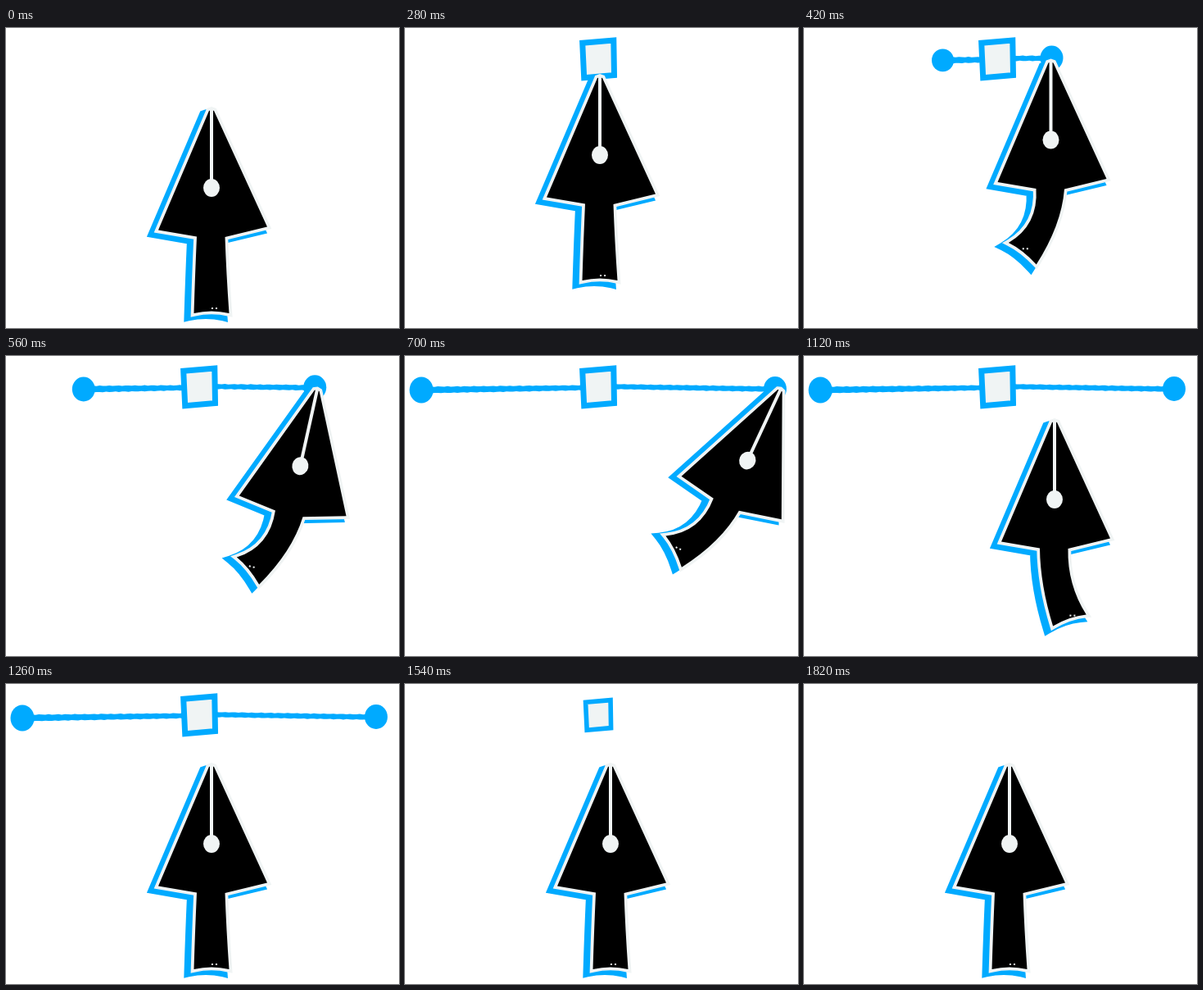
Write an HTML page with a canvas that moves like this. It is 480 by 366 pixels and loops after 1.96 s.

```html
<!DOCTYPE html>
<html lang="en">
<head>
<meta charset="utf-8">
<title>Pen tool</title>
<style>
  html, body { margin: 0; width: 100%; height: 100%; overflow: hidden; background: #fff; }
  canvas { display: block; }
</style>
</head>
<body>
<canvas id="stage" width="480" height="366"></canvas>
<script>
const ctx = document.getElementById('stage').getContext('2d');
const BLUE = '#00aaff', PAPER = '#f0f4f4', INK = '#000';
const STEP = 140, STEPS = 14, REACH = 216;
const rad = deg => deg * Math.PI / 180;
const mix = (a, b, k) => a + (b - a) * k;

// Key poses; the steps between them are interpolated
const rest = { x: 250, y: 100, angle: 0, bend: 0, reach: 0, anchor: 0 };
const open = { ...rest, reach: REACH, anchor: 1 };
const keys = [
  { ...rest, at: 0 },
  { ...rest, at: 1, y: 66.5 },
  { ...rest, at: 2, x: 237, y: 60, anchor: 1 },
  { ...open, at: 3, x: 300.5, y: 41.5, bend: -1, reach: 66.5 },
  { ...open, at: 5, x: 457.5, y: 41, angle: 25, bend: -1 },
  { ...open, at: 7, x: 360, y: 60, bend: 1 },
  { ...open, at: 9 },
  { ...rest, at: 11, anchor: 0.8 },
  { ...rest, at: 12, anchor: 1.3 },
  { ...rest, at: 13 }
];

function poseAt(step) {
  const next = keys.findIndex(key => key.at >= step);
  const b = keys[next], a = keys[Math.max(0, next - 1)];
  const k = b.at > a.at ? (step - a.at) / (b.at - a.at) : 0;
  const pose = {};
  for (const name in rest) pose[name] = mix(a[name], b[name], k);
  return pose;
}

function disc(x, y, rx, ry, color) {
  ctx.fillStyle = color;
  ctx.beginPath();
  ctx.ellipse(x, y, rx, ry, 0, 0, Math.PI * 2);
  ctx.fill();
}

function paint(path, color, edge = color, width = 0) {
  ctx.fillStyle = color;
  ctx.fill(path);
  if (!width) return;
  ctx.strokeStyle = edge;
  ctx.lineWidth = width;
  ctx.stroke(path);
}

// Marker line with slightly uneven edges
function markerLine(x0, y0, x1, y1, w0, w1) {
  const n = Math.ceil(Math.abs(x1 - x0) / 4);
  const edge = (i, side) => {
    const k = i / n;
    const rough = 0.35 * Math.sin(i * 2.3 + side);
    ctx.lineTo(mix(x0, x1, k), mix(y0, y1, k) + side * mix(w0, w1, k) / 2 + rough);
  };
  ctx.fillStyle = BLUE;
  ctx.beginPath();
  for (let i = 0; i <= n; i++) edge(i, -1);
  for (let i = n; i >= 0; i--) edge(i, 1);
  ctx.fill();
}

function drawHandles(reach) {
  if (!reach) return;
  const k = reach / REACH;
  const left = 236 - reach, right = 236 + reach;
  const leftY = 38.5 + 3 * k, rightY = 35 + 5 * k;
  markerLine(left, leftY, 236, 38.5, 8, 6);
  markerLine(236, 37, right, rightY + 0.5, 6, 6.5);
  disc(left, leftY, 13 + 1.5 * k, 13 + 3 * k, BLUE);
  disc(right, rightY, 14, 15, BLUE);
}

function drawAnchor(scale) {
  if (!scale) return;
  ctx.save();
  ctx.translate(236, 38);
  ctx.scale(scale, scale);
  paint(new Path2D('M-19.3-19.7L18.8-23L19.5 19.5L-17.3 22.8Z'), PAPER, BLUE, 7);
  ctx.restore();
}

// Middle of the tail's end: it swings around the neck as the tail bends
function tailEnd(bend) {
  const swing = rad(23.5 * bend), length = 94 - 7 * Math.abs(bend);
  return { x: 1 + length * Math.sin(swing), y: 154 + length * Math.cos(swing) };
}

function penPath(bend, end) {
  const dx = 21.5 * Math.cos(rad(38 * bend)), dy = -21.5 * Math.sin(rad(38 * bend));
  const waist = 19 - 5 * Math.abs(bend);
  const p = new Path2D();
  p.moveTo(-2, 1);
  p.lineTo(1, 0);
  p.lineTo(4, 1);
  p.lineTo(69, 142.5);
  p.lineTo(17.5, 155);
  p.quadraticCurveTo(waist, 199, end.x + dx, end.y + dy);
  p.quadraticCurveTo(end.x, end.y - 5, end.x - dx, end.y - dy);
  p.quadraticCurveTo(-waist, 199, -17, 154.5);
  p.lineTo(-64, 146.5);
  p.closePath();
  return p;
}

function drawPen({ x, y, angle, bend }) {
  const end = tailEnd(bend), shape = penPath(bend, end);
  ctx.save();
  ctx.translate(x, y);
  ctx.rotate(rad(angle));

  ctx.save();
  ctx.translate(-7, 4.5);
  paint(shape, BLUE, BLUE, 10);
  ctx.restore();

  paint(shape, PAPER, PAPER, 7.5);
  paint(shape, INK);

  ctx.fillStyle = PAPER;
  ctx.fillRect(-1, -1, 4, 90);
  disc(1, 95, 10, 11, PAPER);
  for (const dx of [0, 5]) ctx.fillRect(end.x + dx, end.y - 7, 2, 2);
  ctx.restore();
}

function draw(now) {
  const pose = poseAt(Math.floor(now / STEP) % STEPS);
  ctx.fillStyle = '#fff';
  ctx.fillRect(0, 0, 480, 366);
  drawHandles(pose.reach);
  drawAnchor(pose.anchor);
  drawPen(pose);
}

const start = performance.now();
function tick() {
  draw(performance.now() - start);
  requestAnimationFrame(tick);
}
tick();
</script>
</body>
</html>
```
